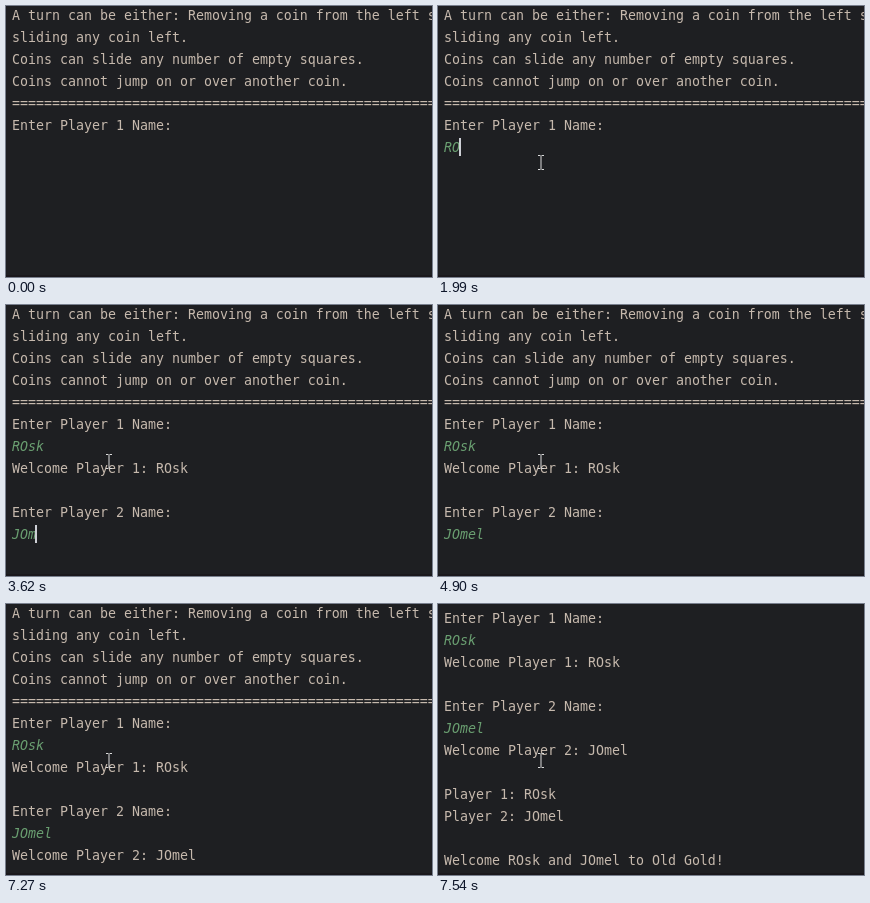
Animation, 426 px wide and 271 px high, one loop 8000 ms. Source, as an HTML page:

```html
<!DOCTYPE html>
<html lang="en">
<head>
<meta charset="utf-8">
<title>Coin game console</title>
<style>
  html, body { margin: 0; width: 100%; height: 100%; overflow: hidden; background: #1e1f22; }
  svg { display: block; }
  text { font: 13.29px "DejaVu Sans Mono", monospace; fill: #c6b9ad; white-space: pre; }
  .input { font-style: italic; fill: #6a9f71; }
  #caret { fill: #ced0d6; }
  #mouse { fill: none; stroke: #dcdcdc; }
</style>
</head>
<body>
<svg width="426" height="271" viewBox="0 0 426 271">
  <g id="page">
    <g id="lines"></g>
    <rect id="caret" width="2" height="18"/>
  </g>
  <rect y="269" width="426" height="2" fill="#1a181c"/>
  <path id="mouse" d="M1 .5H3.5M4.5 .5H7M4 1V14M1 14.5H3.5M4.5 14.5H7"/>
</svg>
<script>
const LOOP = 8000, LEFT = 6, ROW = 22, BASE = 14;
const one = "ROsk", two = "JOmel";
const ONE_ROW = 6, TWO_ROW = 10;

// Each line: text, time it appears, and key times if it is typed.
const lines = [
  ["A turn can be either: Removing a coin from the left square or", 0],
  ["sliding any coin left.", 0],
  ["Coins can slide any number of empty squares.", 0],
  ["Coins cannot jump on or over another coin.", 0],
  ["=".repeat(60), 0],
  ["Enter Player 1 Name:", 0],
  [one, 0, [1900, 1990, 2260, 2360]],
  [`Welcome Player 1: ${one}`, 2710],
  ["", 0],
  ["Enter Player 2 Name:", 2710],
  [two, 0, [3170, 3350, 3620, 3900, 4080]],
  [`Welcome Player 2: ${two}`, 7270],
  ["", 0],
  [`Player 1: ${one}`, 7450],
  [`Player 2: ${two}`, 7450],
  ["", 0],
  [`Welcome ${one} and ${two} to Old Gold!`, 7450],
];

// Held values: [start time, value].
const scroll = [[0, 0], [7450, 61], [7540, 105]];
const caretOn = [[0, 0], [890, 1], [1350, 0], [1810, 1], [4900, 0], [5350, 1],
  [5900, 0], [6450, 1], [6900, 0]];
const mousePos = [[0, null], [260, [97, 198]], [350, [76, 179]], [440, [51, 157]],
  [530, [34, 142]], [800, [39, 146]], [1170, [34, 142]], [1260, [72, 146]], [1350, [99, 149]]];

const $ = id => document.getElementById(id);
const page = $("page"), caret = $("caret"), mouse = $("mouse");
const held = (track, t) => track.findLast(([start]) => start <= t)[1];
const typed = (keys, t) => keys.filter(k => k <= t).length;
const show = (el, on) => el.setAttribute("visibility", on ? "visible" : "hidden");

const nodes = lines.map(([, , keys], row) => {
  const el = document.createElementNS("http://www.w3.org/2000/svg", "text");
  el.setAttribute("x", LEFT);
  el.setAttribute("y", BASE + row * ROW);
  if (keys) el.setAttribute("class", "input");
  return $("lines").appendChild(el);
});

function draw(now) {
  const t = now % LOOP;
  lines.forEach(([text, start, keys], i) => {
    const value = t < start ? "" : keys ? text.slice(0, typed(keys, t)) : text;
    if (nodes[i].textContent !== value) nodes[i].textContent = value;
  });
  page.setAttribute("transform", `translate(0 ${-held(scroll, t)})`);

  const row = t < 2710 ? ONE_ROW : TWO_ROW;
  const count = typed(lines[row][2], t);
  caret.setAttribute("x", LEFT + (count ? count * 8 - 1 : 0));
  caret.setAttribute("y", row * ROW);
  show(caret, held(caretOn, t));

  const pos = held(mousePos, t);
  show(mouse, pos);
  if (pos) mouse.setAttribute("transform", `translate(${pos})`);
  requestAnimationFrame(draw);
}
draw(performance.now());
</script>
</body>
</html>
```
